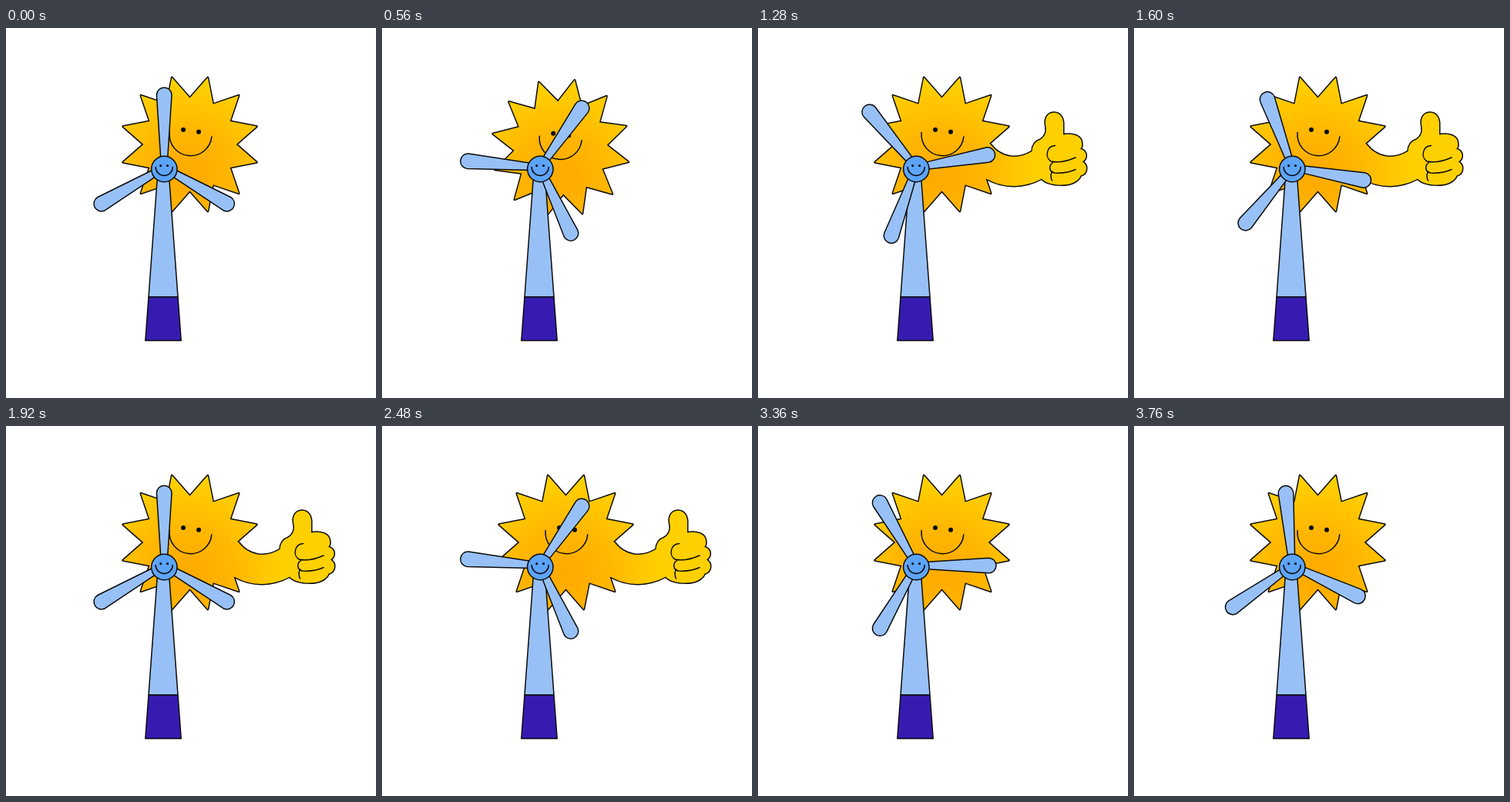
Write an HTML page with a canvas that moves like this. It is 480 by 480 pixels and loops after 3840 ms.

```html
<!DOCTYPE html>
<html lang="en">
<head>
<meta charset="utf-8">
<title>Sun and wind</title>
<style>
  html, body { margin: 0; width: 100%; height: 100%; overflow: hidden; background: #fff; }
  canvas { display: block; width: 480px; height: 480px; }
</style>
</head>
<body>
<canvas id="stage" width="480" height="480"></canvas>
<script>
const ctx = document.getElementById('stage').getContext('2d');
const LOOP = 3840, STEP = 80, LINE = 1.5;
const INK = '#0b0b0b', SKY = '#97c1f6', HUB = '#5da4f8', BASE = '#371bb1';
const SUN = { x: 238.5, y: 151 };
const SHOULDER = { x: 270, y: 175 };

const ARM = new Path2D(`M256 128 Q284 132 302 151.5 C315 168 336 172 355.5 160
  C356 152 360 147 366 145 C371 142 375 136 373.5 128 C371 118 375 110 384 109.7
  C392 110 395.500 116 396 123 L396 138.500 C408 136 420 140 420 149 Q421 154 418 157
  C427 159 428 169 421 173.500 C429 178 427 190 418.500 191.500
  C416 199 406 203.500 394 203.500 C382 203.500 373 201 368 195.500
  C345 208 319 208 297 196 Q272 190 256 172 Z`);
const FINGERS = new Path2D(`M385.500 152.500 C374 153 372 168 380 173 Q394 176 412 168
  M383 174 C376 179 378 187 385 188 Q400 189 412 183.500
  M381.500 186 Q378.500 192 381.500 198`);

// Keyframes [time, value] joined by a smooth ease
function track(t, keys) {
  if (t <= keys[0][0]) return keys[0][1];
  for (let i = 1; i < keys.length; i++) {
    const [t0, a] = keys[i - 1], [t1, b] = keys[i];
    if (t <= t1) {
      const x = (t - t0) / (t1 - t0);
      return a + (b - a) * x * x * (3 - 2 * x);
    }
  }
  return keys[keys.length - 1][1];
}

function paint(path, fill) {
  ctx.fillStyle = fill;
  ctx.fill(path);
  ctx.stroke(path);
}

function dot(x, y, r) {
  ctx.fillStyle = INK;
  ctx.beginPath();
  ctx.arc(x, y, r, 0, Math.PI * 2);
  ctx.fill();
}

function smile(x, y, r, tilt) {
  ctx.beginPath();
  ctx.arc(x, y, r, tilt, Math.PI + tilt);
  ctx.stroke();
}

function polygon(points) {
  const path = new Path2D();
  points.forEach(([x, y]) => path.lineTo(x, y));
  path.closePath();
  return path;
}

function star(x, y, turn) {
  return polygon(Array.from({ length: 24 }, (_, i) => {
    const r = i % 2 ? 89.8 : 60.2, a = i * Math.PI / 12 + turn;
    return [x + r * Math.sin(a), y - r * Math.cos(a)];
  }));
}

function placeArm(path, tuck) {
  const m = new DOMMatrix()
    .translate(SHOULDER.x - 75 * tuck, SHOULDER.y + 42 * tuck * (1 - tuck))
    .rotate(39 * tuck)
    .scale(1 - 0.7 * Math.max(0, tuck) ** 3)
    .translate(-SHOULDER.x, -SHOULDER.y);
  const placed = new Path2D();
  placed.addPath(path, m);
  return placed;
}

function outline(path) {
  ctx.lineWidth = LINE * 2;
  ctx.stroke(path);
  ctx.lineWidth = LINE;
}

function drawSun(t) {
  const lean = track(t, [[160, 0], [560, 1], [640, 1], [800, 0]]);
  const tuck = track(t, [[640, 1], [960, -0.1], [1120, 0], [2840, 0], [3230, 1]]);
  const x = SUN.x - 6.8 * lean, y = SUN.y + 4.5 * lean;
  const body = star(x, y, -3.3 * lean * Math.PI / 180);
  const glow = ctx.createRadialGradient(x - 2, y + 42, 15, x - 2, y + 42, 122);
  glow.addColorStop(0, '#ffac00');
  glow.addColorStop(0.4, '#ffb602');
  glow.addColorStop(1, '#ffd000');

  // Outlines first, then fills, so that sun and arm share one contour
  outline(body);
  if (tuck < 1) {
    const arm = placeArm(ARM, tuck);
    outline(arm);
    ctx.fillStyle = glow;
    ctx.fill(arm);
    ctx.stroke(placeArm(FINGERS, tuck));
  }
  ctx.fillStyle = glow;
  ctx.fill(body);

  const fx = -7.8 * lean, fy = 4.8 * lean;
  dot(230 + fx, 132 + fy, 3);
  dot(250 + fx, 134.7 + fy, 3);
  smile(239.5 + fx, 138.2 + fy, 27.5, 0.1);
}

function drawTurbine(t) {
  paint(polygon([[197, 185], [211, 185], [223, 349], [185, 349]]), SKY);
  paint(polygon([[185, 349], [223, 349], [227.2, 405.5], [180.8, 405.5]]), BASE);

  const blade = new Path2D();
  blade.moveTo(-3.7, 0);
  blade.lineTo(-9.8, -94);
  blade.arc(0, -94, 9.8, Math.PI, 0);
  blade.lineTo(3.7, 0);
  blade.closePath();
  for (let i = 0; i < 3; i++) {
    ctx.save();
    ctx.translate(205.2, 181);
    ctx.rotate((t / LOOP * 240 + i * 120) * Math.PI / 180);
    paint(blade, SKY);
    ctx.restore();
  }

  const hub = new Path2D();
  hub.arc(205.3, 183, 16.7, 0, Math.PI * 2);
  paint(hub, HUB);
  dot(200.7, 178.6, 1.6);
  dot(209.5, 178.6, 1.6);
  smile(205.2, 180.5, 11, 0);
}

function frame(now) {
  const t = Math.floor(now % LOOP / STEP) * STEP;
  ctx.fillStyle = '#fff';
  ctx.fillRect(0, 0, 480, 480);
  ctx.strokeStyle = INK;
  ctx.lineWidth = LINE;
  ctx.lineJoin = ctx.lineCap = 'round';
  drawSun(t);
  drawTurbine(t);
}

const start = performance.now();
function tick() {
  frame(performance.now() - start);
  requestAnimationFrame(tick);
}
tick();
</script>
</body>
</html>
```
